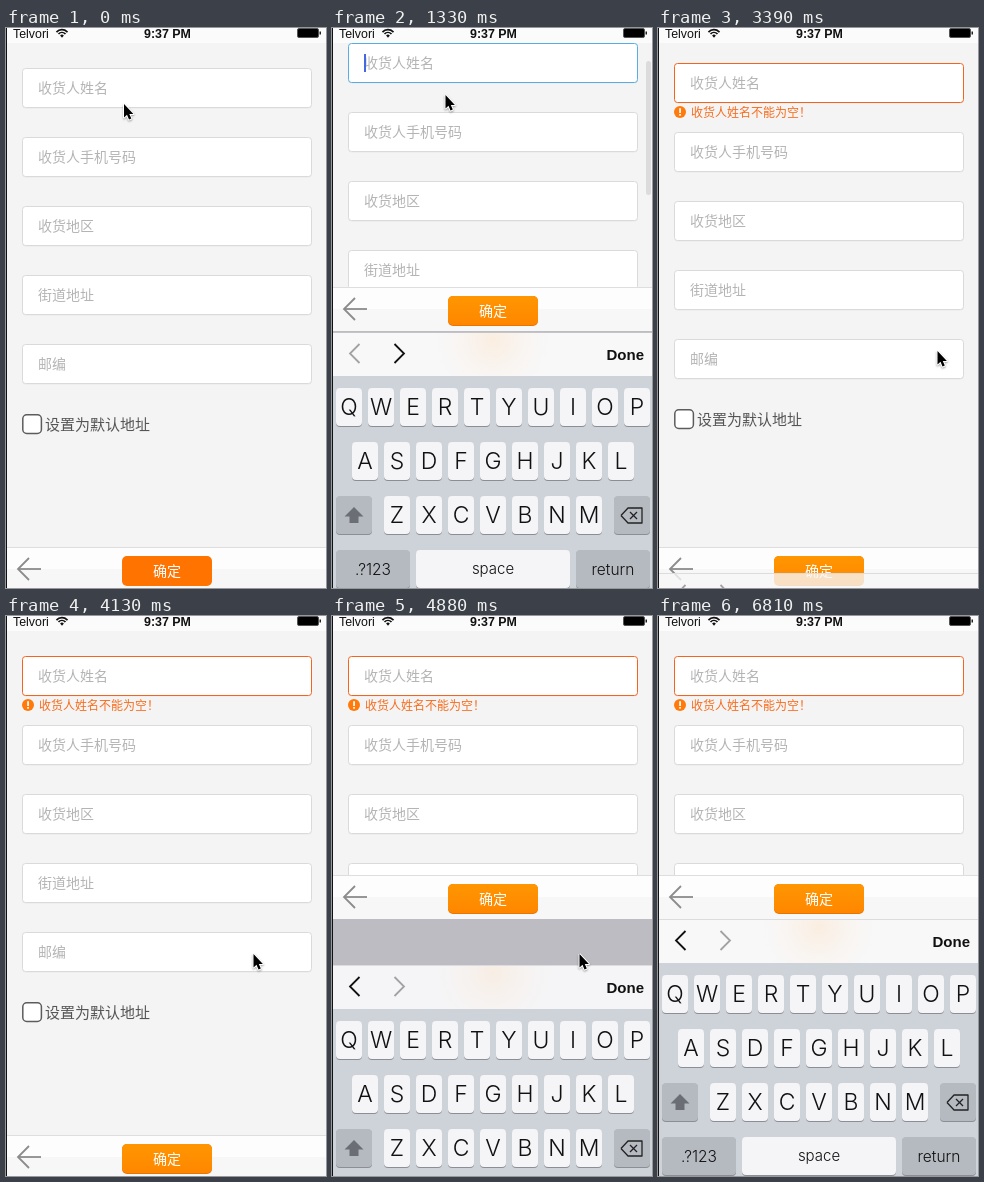
Write an HTML page with a canvas that moves like this. It is 320 px wide and 560 px high and loops after 8220 ms.

```html
<!DOCTYPE html>
<html lang="zh-CN">
<head>
<meta charset="utf-8">
<title>收货地址</title>
<style>
html, body { margin: 0; width: 100%; height: 100%; overflow: hidden; background: #f4f4f4; }
canvas { display: block; width: 320px; height: 560px; }
</style>
</head>
<body>
<canvas id="stage"></canvas>
<script>
const W = 320, H = 560, LOOP = 8220, STEP = 147.7;
const CJK = '"Noto Sans CJK SC", "Noto Sans CJK", sans-serif';
const SANS = '"Liberation Sans", Arial, sans-serif';
const KEY = 'Inter, "Liberation Sans", sans-serif';
const FIELDS = ['收货人姓名', '收货人手机号码', '收货地区', '街道地址', '邮编'];

const canvas = document.getElementById('stage');
const g = canvas.getContext('2d');
const dpr = window.devicePixelRatio || 1;
canvas.width = W * dpr;
canvas.height = H * dpr;

const clamp = x => Math.max(0, Math.min(1, x));
const mix = (a, b, u) => a + (b - a) * u;
const smooth = u => u * u * (3 - 2 * u);

// Share of the way left for a critically damped spring
function left(ms) {
  const k = Math.max(0, ms) * 0.017;
  return Math.exp(-k) * (1 + k);
}

function rect(x, y, w, h, fill) {
  g.fillStyle = fill;
  g.fillRect(x, y, w, h);
}

function box(x, y, w, h, r, fill, stroke, line = 1) {
  g.beginPath();
  g.roundRect(x, y, w, h, r);
  if (fill) { g.fillStyle = fill; g.fill(); }
  if (stroke) { g.strokeStyle = stroke; g.lineWidth = line; g.stroke(); }
}

function text(str, x, y, font, fill, align = 'left') {
  g.font = font;
  g.fillStyle = fill;
  g.textAlign = align;
  g.fillText(str, x, y);
}

function path(points, stroke, line, fill) {
  g.beginPath();
  points.forEach(([x, y], i) => i ? g.lineTo(x, y) : g.moveTo(x, y));
  if (fill) { g.closePath(); g.fillStyle = fill; g.fill(); }
  if (stroke) { g.strokeStyle = stroke; g.lineWidth = line; g.stroke(); }
}

function statusBar() {
  rect(0, 0, W, 15, '#fbfbfb');
  text('Telvori', 7, 9.5, '12.4px ' + SANS, '#111');
  text('9:37 PM', 161.5, 9.5, 'bold 12.4px ' + SANS, '#111', 'center');
  g.strokeStyle = '#111';
  g.lineWidth = 1.7;
  for (const r of [7.6, 4.8]) {
    g.beginPath();
    g.arc(56, 9.3, r, -Math.PI * 0.76, -Math.PI * 0.24);
    g.stroke();
  }
  g.beginPath();
  g.moveTo(56, 9.8);
  g.arc(56, 9.3, 2.6, -Math.PI * 0.76, -Math.PI * 0.24);
  g.fillStyle = '#111';
  g.fill();
  box(291.5, 0.5, 21, 9, 1.5, '#000', '#555');
  rect(313.5, 3.5, 1.5, 3, '#222');
}

function form(s) {
  g.save();
  g.beginPath();
  g.rect(0, 15, W, s.bar - 15);
  g.clip();
  g.translate(0, -s.scroll);
  FIELDS.forEach((label, i) => {
    const y = 40 + i * 69;
    let edge = '#dadada';
    if (i === 0 && s.focus) edge = '#58aee0';
    if (i === 0 && s.error) edge = '#f4641e';
    box(16.5, y + 1.5, 289, 39, 3, '#e9e9e9');
    box(16.5, y + 0.5, 289, 39, 3, '#fff', edge);
    text(label, 32, y + 25.3, '14px ' + CJK, '#b4b4b4');
  });
  if (s.caret) rect(32, 51, 2, 18, '#4468e0');
  if (s.error) {
    g.beginPath();
    g.arc(22, 89, 6, 0, 7);
    g.fillStyle = '#ff7a0a';
    g.fill();
    rect(21.2, 85.2, 1.7, 4.8, '#fff');
    rect(21.2, 91, 1.7, 1.7, '#fff');
    text('收货人姓名不能为空！', 33, 93.5, '12px ' + CJK, '#f86c1c');
  }
  box(16.8, 386.8, 18.6, 18.6, 4, '#fff', '#5c5c5c', 1.5);
  text('设置为默认地址', 39, 401.5, '15px ' + CJK, '#555');
  g.restore();
}

function bottomBar(y, flat) {
  rect(0, y, W, 44, '#f7f7f7');
  rect(0, y, W, 22, '#fdfdfd');
  rect(0, y, W, 1, '#dedede');
  path([[23, y + 11], [12, y + 22], [23, y + 33]], '#8c8c8c', 1.8);
  path([[12, y + 22], [35, y + 22]], '#8c8c8c', 1.8);
  if (flat) {
    box(116, y + 9, 90, 30, 5, '#ff7300');
  } else {
    const fill = g.createLinearGradient(0, y + 9, 0, y + 39);
    fill.addColorStop(0, '#ff9600');
    fill.addColorStop(1, '#ff8600');
    box(116, y + 9, 90, 30, 5, '#ea7400');
    box(116, y + 9, 90, 29, 5, fill);
  }
  text('确定', 161, y + 28.8, '14px ' + CJK, '#fff', 'center');
}

function key(x, y, w, label, size, dark) {
  box(x, y + 1, w, 38, 4, '#8b8e94');
  box(x, y, w, 38, 4, dark ? '#b5b9c0' : '#f5f5f8');
  if (label) text(label, x + w / 2, y + 19 + size * 0.36, `300 ${size}px ${KEY}`, '#111', 'center');
}

function keyboard(s) {
  const { top, up } = s;
  if (top >= H) return;
  rect(0, top, W, 44, `rgba(248,248,249,${mix(0.78, 1, up)})`);
  const glow = g.createRadialGradient(161, top + 8, 0, 161, top + 8, 60);
  glow.addColorStop(0, `rgba(255,215,170,${0.32 * up})`);
  glow.addColorStop(1, 'rgba(255,235,215,0)');
  rect(100, top, 122, 44, glow);
  rect(0, top, W, 1, s.focus ? '#c4c4c6' : '#dcdcde');

  const shade = on => on ? '#111' : '#a2a2a5';
  path([[27.5, top + 12], [18, top + 21.5], [27.5, top + 31]], shade(s.prev), 1.8);
  path([[62.5, top + 12], [72, top + 21.5], [62.5, top + 31]], shade(s.next), 1.8);
  text('Done', 312, top + 28, 'bold 15px ' + SANS, s.press ? '#aaa' : '#111', 'right');

  rect(0, top + 44, W, H, '#ced2d9');
  ['QWERTYUIOP', 'ASDFGHJKL', 'ZXCVBNM'].forEach((row, r) => {
    const x = [4, 20, 52][r];
    [...row].forEach((c, i) => key(x + i * 32, top + 56 + r * 54, 26, c, 23));
  });
  const y3 = top + 164, y4 = top + 218;
  key(4, y3, 36, '', 0, true);
  key(282, y3, 36, '', 0, true);
  key(4, y4, 74, '.?123', 15.5, true);
  key(84, y4, 154, 'space', 15, false);
  key(244, y4, 74, 'return', 15.5, true);

  const shift = [[22, 11], [31.5, 20.5], [26.5, 20.5], [26.5, 27], [17.5, 27], [17.5, 20.5], [12.5, 20.5]];
  path(shift.map(([x, y]) => [x, y3 + y]), null, 0, '#6b6e74');
  const del = [[289, 19.5], [296, 12], [310, 12], [310, 27], [296, 27]];
  g.lineJoin = 'round';
  path([...del, del[0]].map(([x, y]) => [x, y3 + y]), '#222', 1.3);
  path([[298, y3 + 16], [305, y3 + 23]], '#222', 1.3);
  path([[305, y3 + 16], [298, y3 + 23]], '#222', 1.3);
  g.lineJoin = 'miter';
}

function pointer([x, y]) {
  const shape = [[0, 0], [0, 13.5], [3, 10.8], [5, 15.6], [7.3, 14.6], [5.3, 10], [9.4, 10]];
  const pts = shape.map(([a, b]) => [x + a, y + b]);
  g.save();
  g.lineJoin = 'round';
  g.shadowColor = 'rgba(0,0,0,.35)';
  g.shadowBlur = 2 * dpr;
  g.shadowOffsetY = dpr;
  path([...pts, pts[0]], '#fff', 2);
  g.restore();
  path(pts, null, 0, '#000');
}

// Moves: first step, last step, end point, easing
const MOVES = [
  [0, 3, [113.5, 67], u => 1 - (1 - u) ** 2],
  [11.5, 19, [279.5, 323], smooth],
  [24, 28, [247.5, 338], u => u * u],
  [40, 46, [332, 580], u => u ** 1.5]
];

function pointerAt(n) {
  let pos = [118, 76];
  for (const [from, to, end, ease] of MOVES) {
    const u = ease(clamp((n - from) / (to - from)));
    pos = pos.map((v, i) => mix(v, end[i], u));
  }
  return pos;
}

function stateAt(t) {
  const n = Math.floor((t + 10) / STEP), q = n * STEP;
  const open1 = n >= 6 && n < 21, open2 = n >= 32;
  let up = 0;
  if (n >= 6) up = 1 - left(q - 890);
  if (n >= 21) up = left(q - 3127);
  if (n >= 32) up = 1 - left(q - 4690);
  let scroll = 0;
  if (n >= 6) scroll = 25 * (1 - left(q - 890));
  if (n >= 21) scroll = 25 * left(q - 3220);
  const focus = n >= 7 && n < 21;
  return {
    n, up, focus,
    top: Math.round(mix(H, 303, up)),
    scroll: Math.round(scroll),
    bar: open1 || open2 ? 259 : 519,
    error: n >= 21,
    caret: focus && (n < 12 || n % 6 > 2),
    prev: n >= 33,
    next: focus,
    press: n === 20,
    thumb: n === 8 || n === 9
  };
}

function draw(t) {
  const s = stateAt(t);
  g.setTransform(dpr, 0, 0, dpr, 0, 0);
  rect(0, 0, W, H, '#f4f4f4');
  form(s);
  if (s.bar < 300) rect(0, 303, W, H - 303, '#bdbcc2');
  statusBar();
  bottomBar(s.bar, s.n === 0);
  if (s.thumb) box(314, 33, 5, 134, 2.5, '#dcdcdc');
  keyboard(s);
  rect(0, 0, 1, H, '#111');
  if (s.n < 46) pointer(pointerAt(s.n));
}

const start = performance.now();
function tick() {
  draw((performance.now() - start) % LOOP);
  requestAnimationFrame(tick);
}
tick();
</script>
</body>
</html>
```
